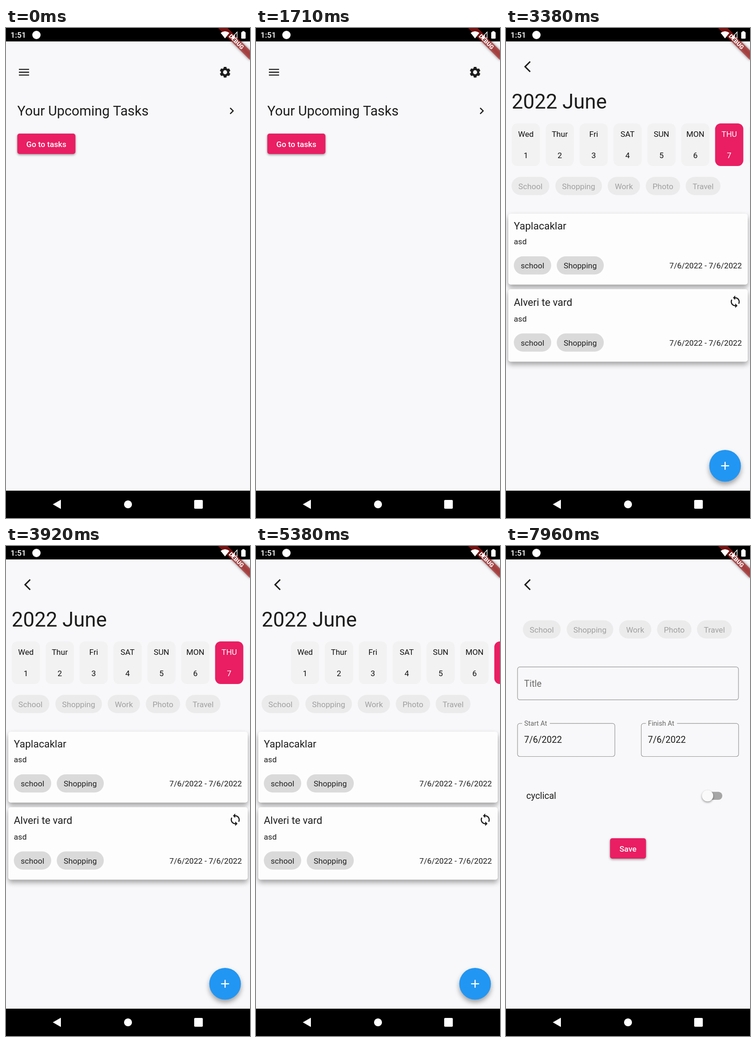
These frames come from a looping animation (529 by 1058 pixels, 8 s). An HTML page with a canvas:

```html
<!DOCTYPE html>
<html lang="en">
<head>
<meta charset="utf-8">
<title>Task planner</title>
<style>
html, body { margin: 0; width: 100%; height: 100%; overflow: hidden; background: #000; }
canvas { display: block; width: 100vw; height: 100vh; }
</style>
</head>
<body>
<canvas id="stage" width="529" height="1058"></canvas>
<script>
const ctx = document.getElementById('stage').getContext('2d');
const W = 529, H = 1058, LOOP = 8000;
const DP = W / 432;
const APP_TOP = 29, APP_BOTTOM = 999;
const BG = '#f8f8fa', INK = '#1d1d1d', PINK = '#e91e63', BLUE = '#2196f3';

const ICONS = {
  menu: 'M3 18h18v-2H3v2zm0-5h18v-2H3v2zm0-7v2h18V6H3z',
  next: 'M10 6L8.59 7.41 13.17 12l-4.58 4.59L10 18l6-6z',
  back: 'M11.67 3.87L9.9 2.1 0 12l9.9 9.9 1.77-1.77L3.54 12z',
  plus: 'M19 13h-6v6h-2v-6H5v-2h6V5h2v6h6v2z',
  sync: 'M12 4V1L8 5l4 4V6c3.31 0 6 2.69 6 6 0 1.01-.25 1.97-.7 2.8l1.46 1.46C19.54 15.03 20 13.57 20 12c0-4.42-3.58-8-8-8z' +
        'm0 14c-3.31 0-6-2.69-6-6 0-1.01.25-1.97.7-2.8L5.24 7.74C4.46 8.97 4 10.43 4 12c0 4.42 3.58 8 8 8v3l4-4-4-4v3z'
};
for (const name in ICONS) ICONS[name] = new Path2D(ICONS[name]);

const DAYS = ['Wed', 'Thur', 'Fri', 'SAT', 'SUN', 'MON', 'THU', 'FRI'];
const TAGS = [['School', 12, 82], ['Shopping', 107, 101], ['Work', 220.5, 70], ['Photo', 303, 74.5], ['Travel', 389.5, 75.5]];

// Horizontal offset of the day strip: [ms, px]
const DRAG = [
  [2420, 0], [2710, 114.3], [2780, 114.3], [3270, 0],
  [3400, 0], [3620, 118], [3890, 0],
  [4700, 0], [5040, 175], [5100, 175], [5540, 16], [5960, -6.5]
];
const OPEN_TASKS = 1800, OPEN_FORM = 7300, OPEN_TIME = 300;

const clamp = v => Math.min(1, Math.max(0, v));
const span = (t, a, b) => clamp((t - a) / (b - a));
const smooth = u => u * u * (3 - 2 * u);

function stripOffset(t) {
  let [t0, x0] = DRAG[0];
  for (const [t1, x1] of DRAG) {
    if (t < t1) return x0 + (x1 - x0) * smooth(span(t, t0, t1));
    [t0, x0] = [t1, x1];
  }
  return x0;
}

// y is the middle of the capital letters; size is in dp
function text(str, x, y, size, color = INK, align = 'left', weight = 400) {
  const px = size * DP;
  ctx.font = `${weight} ${px}px Roboto, sans-serif`;
  ctx.textAlign = align;
  ctx.fillStyle = color;
  ctx.fillText(str, x, y + px * 0.355);
}

function box(x, y, w, h, r, color) {
  ctx.beginPath();
  ctx.roundRect(x, y, w, h, r);
  ctx.fillStyle = color;
  ctx.fill();
}

function disc(x, y, r, color) {
  ctx.beginPath();
  ctx.arc(x, y, r, 0, Math.PI * 2);
  ctx.fillStyle = color;
  ctx.fill();
}

function polygon(points, color) {
  ctx.beginPath();
  points.forEach(([x, y]) => ctx.lineTo(x, y));
  ctx.closePath();
  ctx.fillStyle = color;
  ctx.fill();
}

function raised(blur, dy, alpha, draw) {
  ctx.save();
  ctx.shadowColor = `rgba(0,0,0,${alpha})`;
  ctx.shadowBlur = blur;
  ctx.shadowOffsetY = dy;
  draw();
  ctx.restore();
}

// Centred 24 dp icon
function icon(name, cx, cy, color = INK) {
  ctx.save();
  ctx.translate(cx, cy);
  ctx.scale(DP, DP);
  ctx.translate(-12, -12);
  ctx.fillStyle = color;
  ctx.fill(ICONS[name]);
  ctx.restore();
}

function gear(cx, cy) {
  const corners = [[-21, 7.5], [-14, 9.7], [14, 9.7], [21, 7.5]];
  ctx.save();
  ctx.translate(cx, cy);
  ctx.scale(DP, DP);
  ctx.beginPath();
  for (let tooth = 0; tooth < 6; tooth++) {
    for (const [deg, r] of corners) {
      const a = (tooth * 60 - 90 + deg) * Math.PI / 180;
      ctx.lineTo(r * Math.cos(a), r * Math.sin(a));
    }
  }
  ctx.closePath();
  ctx.moveTo(3.6, 0);
  ctx.arc(0, 0, 3.6, 0, Math.PI * 2);
  ctx.fillStyle = INK;
  ctx.fill('evenodd');
  ctx.restore();
}

function button(label, x, y, w) {
  raised(5, 2, 0.4, () => box(x, y, w, 44, 5, PINK));
  text(label, x + w / 2, y + 22.5, 14, '#fff', 'center', 500);
}

function chip(label, x, y, w, fill, color) {
  box(x, y, w, 39.2, 19.6, fill);
  text(label, x + w / 2, y + 20, 14, color, 'center');
}

function tagRow(dx, y) {
  for (const [label, x, w] of TAGS) chip(label, x + dx, y, w, '#ebebec', '#a0a0a0');
}

function background() {
  ctx.fillStyle = BG;
  ctx.fillRect(0, 0, W, APP_BOTTOM);
}

function homePage() {
  background();
  icon('menu', 39, 95.5);
  gear(475, 95.5);
  text('Your Upcoming Tasks', 24.5, 179, 24);
  icon('next', 489.3, 179);
  button('Go to tasks', 24.5, 228, 126);
}

function dayStrip(dx) {
  DAYS.forEach((name, i) => {
    const x = 12.5 + i * 60 * DP + dx, mid = x + 30.6;
    const chosen = i === 6;
    const color = chosen ? '#fff' : '#111';
    box(x, 206, 61.2, 92, 12.2, chosen ? PINK : '#f2f2f3');
    text(name, mid, 229.3, 14, color, 'center');
    text(String(i + 1), mid, 275.3, 14, color, 'center');
  });
}

function taskCard(title, y, h, titleY, noteY, chipY) {
  raised(12, 6, 0.36, () => box(5, y, 519, h, 5, '#fdfdfd'));
  text(title, 17, titleY, 18);
  text('asd', 17, noteY, 14);
  chip('school', 17, chipY, 81, '#dadadb', '#222');
  chip('Shopping', 110, chipY, 102, '#dadadb', '#222');
  text('7/6/2022 - 7/6/2022', 511.3, chipY + 20, 14, INK, 'right');
}

function tasksPage(t) {
  background();
  icon('back', 53.9, 83.5);
  text('2022 June', 12.2, 158.5, 36);
  dayStrip(stripOffset(t));
  tagRow(0, 321.5);
  taskCard('Yaplacaklar', 401, 153, 427, 461.3, 493);
  taskCard('Alveri te vard', 564, 156.5, 591.7, 628, 659.5);
  icon('sync', 497, 591);
  raised(11, 6, 0.36, () => disc(475, 945.3, 34.3, BLUE));
  icon('plus', 475, 945.3, '#fff');
}

function field(x, y, w, h) {
  ctx.beginPath();
  ctx.roundRect(x, y, w, h, 5);
  ctx.lineWidth = 1.2;
  ctx.strokeStyle = '#979797';
  ctx.stroke();
}

function dateField(label, x, gap) {
  field(x, 383.2, 211, 71.3);
  ctx.fillStyle = BG;
  ctx.fillRect(x + 10, 381, gap, 5);
  text(label, x + 14.5, 383, 12, '#666');
  text('7/6/2022', x + 14.2, 418, 16);
}

function formPage() {
  background();
  icon('back', 53.9, 83.5);
  tagRow(24.5, 160.5);
  field(25, 261.2, 479, 71);
  text('Title', 39.2, 296.7, 16, '#6a6a6a');
  dateField('Start At', 25, 60);
  dateField('Finish At', 293.3, 67.5);
  text('cyclical', 44, 539.5, 16);
  box(428.6, 530.8, 40.4, 17.1, 8.6, '#a6a6a6');
  raised(4, 2, 0.4, () => disc(437, 539.4, 12.2, '#fafafa'));
  button('Save', 225.5, 631, 78);
}

function scaled(page, k, alpha, t) {
  const cx = W / 2, cy = APP_BOTTOM / 2;
  ctx.save();
  ctx.globalAlpha = alpha;
  ctx.translate(cx, cy);
  ctx.scale(k, k);
  ctx.translate(-cx, -cy);
  ctx.beginPath();
  ctx.rect(0, 0, W, APP_BOTTOM);
  ctx.clip();
  page(t);
  ctx.restore();
}

// Incoming page zooms up over the darkened outgoing one
function zoomOver(from, to, u, t) {
  const v = span(u, 1 / 6, 1);
  const p = u < 1 / 6 ? 0.4 * (6 * u) ** 3 : 0.4 + 0.6 * (1 - (1 - v) ** 4);
  scaled(from, 1 + 0.05 * p, 1, t);
  ctx.fillStyle = `rgba(0,0,0,${0.6 * span(u, 0.2075, 0.4175)})`;
  ctx.fillRect(0, 0, W, APP_BOTTOM);
  scaled(to, 0.85 + 0.15 * p, span(u, 0.125, 0.25), t);
}

function debugBanner() {
  ctx.save();
  ctx.beginPath();
  ctx.rect(0, 0, W, APP_BOTTOM);
  ctx.clip();
  ctx.translate(W, 0);
  ctx.rotate(Math.PI / 4);
  const half = 40 * DP, top = 28 * DP, h = 12 * DP;
  ctx.filter = 'blur(3px)';
  box(-half, top, half * 2, h, 0, 'rgba(0,0,0,0.5)');
  ctx.filter = 'none';
  box(-half, top, half * 2, h, 0, 'rgba(183,28,28,0.63)');
  text('DEBUG', 0, top + h / 2, 10.2, '#fff', 'center', 900);
  ctx.restore();
}

function statusIcons() {
  text('1:51', 9.8, 15.2, 14, '#fff', 'left', 500);
  disc(66, 15, 9, '#fff');
  ctx.beginPath();
  ctx.moveTo(474.8, 22.5);
  ctx.lineTo(465.3, 10.6);
  ctx.quadraticCurveTo(474.8, 3.4, 484.3, 10.6);
  ctx.closePath();
  ctx.fillStyle = '#fff';
  ctx.fill();
  ctx.beginPath();
  ctx.moveTo(488.8, 21.8);
  ctx.lineTo(501, 8.8);
  ctx.lineTo(501, 21.8);
  ctx.closePath();
  ctx.lineWidth = 1.4;
  ctx.strokeStyle = '#fff';
  ctx.stroke();
  polygon([[488.8, 21.8], [496, 14.2], [496, 21.8]], '#fff');
  box(510, 8.5, 9.5, 14.5, 1.5, '#fff');
  box(512.5, 6.8, 4.5, 3, 0.5, '#fff');
}

function navBar() {
  ctx.fillStyle = '#000';
  ctx.fillRect(0, APP_BOTTOM, W, H - APP_BOTTOM);
  polygon([[101.5, 1028.5], [119, 1018.5], [119, 1038.5]], '#fff');
  disc(264.5, 1028.5, 8.6, '#fff');
  box(408, 1019, 18.7, 19, 2, '#fff');
}

function draw(t) {
  const toTasks = span(t, OPEN_TASKS, OPEN_TASKS + OPEN_TIME);
  const toForm = span(t, OPEN_FORM, OPEN_FORM + OPEN_TIME);
  if (toForm === 1) formPage();
  else if (toForm > 0) zoomOver(tasksPage, formPage, toForm, t);
  else if (toTasks === 1) tasksPage(t);
  else if (toTasks > 0) zoomOver(homePage, tasksPage, toTasks, t);
  else homePage();

  ctx.fillStyle = '#000';
  ctx.fillRect(0, 0, W, APP_TOP);
  debugBanner();
  statusIcons();
  navBar();
}

const start = performance.now();
function tick() {
  draw((performance.now() - start) % LOOP);
  requestAnimationFrame(tick);
}
tick();
</script>
</body>
</html>
```
